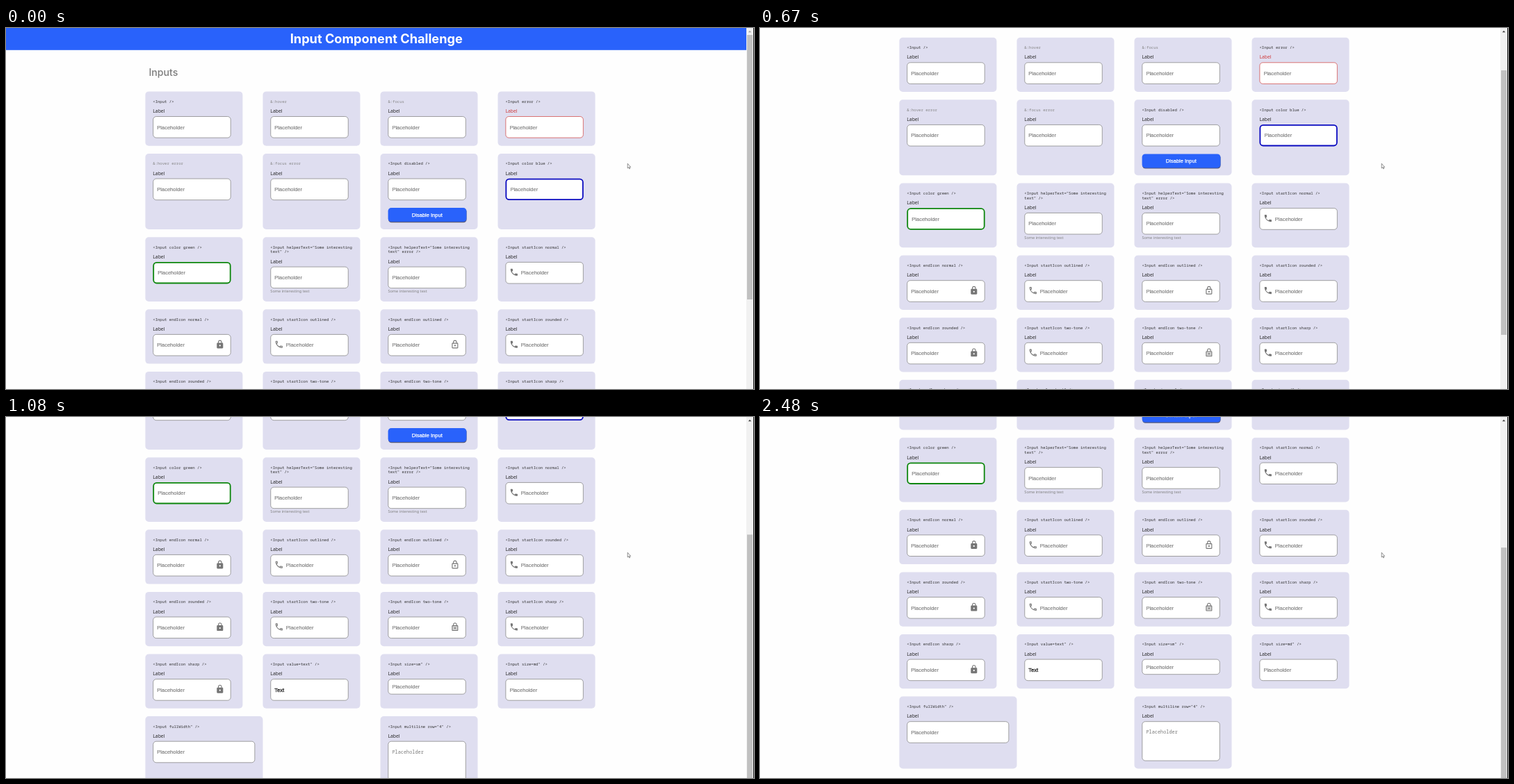
Write an HTML page that moves like this. It is 1076 px wide and 520 px high and loops after 3.29 s.

```html
<!DOCTYPE html>
<html lang="en">
<head>
<meta charset="utf-8">
<title>Input Component Challenge</title>
<style>
  html, body { margin: 0; width: 100%; height: 100%; overflow: hidden; background: #fefefe; }
  svg { display: block; width: 100%; height: 100%; }
  text { white-space: pre; }
  .title { font: 700 18.2px Inter, sans-serif; fill: #fff; text-anchor: middle; }
  .head { font: 500 14.2px Inter, sans-serif; fill: #7d7d7d; }
  .code { font: 5.6px "Noto Sans Mono", monospace; fill: #333; }
  .label { font: 6.8px "Noto Sans", sans-serif; fill: #2a2a2a; }
  .help { font: 5.6px "Noto Sans", sans-serif; fill: #828282; }
  .hint { font: 7.53px "Liberation Sans", Arial, sans-serif; fill: #7c7c7c; stroke: #7c7c7c; stroke-width: .15; }
  .value { fill: #333; stroke: #333; stroke-width: .35; }
  .area { font: 6.88px "Noto Sans Mono", monospace; stroke: none; }
  .btn { font: 7.53px "Liberation Sans", Arial, sans-serif; fill: #fff; stroke: #fff; stroke-width: .25; text-anchor: middle; }
  .dim { fill: #858585; }
  .err { fill: #d03c3c; }
</style>
</head>
<body>
<svg viewBox="0 0 1076 520" preserveAspectRatio="none">
  <rect width="1076" height="520" fill="#fefefe"/>
  <g id="page"></g>
  <rect x="1065" width="10" height="520" fill="#f1f1f1"/>
  <rect id="thumb" x="1066" y="10" width="8" height="381" fill="#c1c1c1"/>
  <path id="arrow" d="M1067.8 6.3L1070 3.8L1072.2 6.3Z"/>
  <rect x="1075" width="1" height="520" fill="#1a1a1a"/>
  <path d="M894.2 195.3V202L895.7 200.7L896.7 202.9L897.7 202.4L896.7 200.3H898.6Z"
        fill="#fff" stroke="#444" stroke-width=".6"/>
</svg>
<script>
const LOOP = 3290;
const PITCH = 169.05;
const LEFT = 200.4;
const ICON_SCALE = 0.565;

const lockBody = 'M18 8h-1V6c0-2.76-2.24-5-5-5S7 3.24 7 6v2H6c-1.1 0-2 .9-2 2v10c0 1.1.9 2 2 2h12c1.1 0 2-.9 2-2V10c0-1.1-.9-2-2-2z';
const lockArch = 'M15.1 8H8.9V6c0-1.71 1.39-3.1 3.1-3.1 1.71 0 3.1 1.39 3.1 3.1z';
const keyhole = 'M12 13a2 2 0 1 0 0 4a2 2 0 1 0 0-4z';
const icons = {
  phone: 'M6.62 10.79c1.44 2.83 3.76 5.14 6.59 6.59l2.2-2.2c.27-.27.67-.36 1.02-.24 1.12.37 2.33.57 3.57.57.55 0 1 .45 1 1V20c0 .55-.45 1-1 1-9.39 0-17-7.61-17-17 0-.55.45-1 1-1h3.5c.55 0 1 .45 1 1 0 1.25.2 2.45.57 3.57.11.35.03.74-.25 1.02z',
  phoneLine: 'M6.54 5c.06.89.21 1.76.45 2.59l-1.2 1.2c-.41-1.2-.67-2.47-.76-3.79zM16.4 17.02c.85.24 1.72.39 2.6.45v1.49c-1.32-.09-2.59-.35-3.8-.75zM7.5 3H4c-.55 0-1 .45-1 1 0 9.39 7.61 17 17 17 .55 0 1-.45 1-1v-3.49c0-.55-.45-1-1-1-1.24 0-2.45-.2-3.57-.57-.36-.12-.75-.03-1.02.24l-2.2 2.2c-2.83-1.45-5.15-3.76-6.59-6.59l2.2-2.2c.28-.28.36-.67.25-1.02C8.7 6.45 8.5 5.25 8.5 4c0-.55-.45-1-1-1z',
  lock: lockBody + lockArch + keyhole,
  lockLine: lockBody + lockArch + 'M6 10H18V20H6z' + keyhole
};

const el = (tag, attrs, body = '') =>
  `<${tag} ${Object.entries(attrs).map(([k, v]) => `${k}="${v}"`).join(' ')}>${body}</${tag}>`;
const esc = s => s.replace(/&/g, '&amp;').replace(/</g, '&lt;');
const text = (cls, x, y, s) => el('text', { class: cls, x, y }, esc(s));
const box = (x, y, width, height, rx, rest) => el('rect', { x, y, width, height, rx, ...rest });

function icon(name, x, y, twoTone) {
  const tint = twoTone && name === 'lockLine'
    ? el('path', { d: 'M6 10H18V20H6z', opacity: 0.35 }) : '';
  return el('g', { transform: `translate(${x} ${y}) scale(${ICON_SCALE})`, fill: '#757575' },
    tint + el('path', { d: icons[name], 'fill-rule': 'evenodd' }));
}

function button(x, y) {
  return box(x + .4, y + 1, 112.6, 20.2, 4.5, { fill: '#55597a' }) +
    box(x, y, 112.8, 20, 4.5, { fill: '#2962fb' }) +
    text('btn', x + 56.2, y + 12.5, 'Disable Input');
}

function card(col, top, height, code, o = {}) {
  const x = LEFT + col * PITCH, ix = x + 10.9;
  const width = o.full ? PITCH : 140;
  const lines = code.split('\n');
  const iy = top + 35.7 + (lines.length - 1) * 6.7;
  const h = o.h || 31.4, w = width - 27.7 + (o.full ? 5.6 : 0);
  const line = o.color ? 1.8 : .8;
  const mid = iy + h / 2;
  const inset = o.start ? 22.4 : o.color ? 7 : 6;
  let out = box(x, top, width, height, 5, { fill: '#dfdef0' });
  lines.forEach((s, i) => out += text('code' + (code[0] === '&' ? ' dim' : ''), ix, top + 16.4 + i * 6.6, s));
  out += text('label' + (o.error ? ' err' : ''), ix, iy - 5, 'Label');
  out += box(ix + line / 2, iy + line / 2, w - line, h - line, 4.5, {
    fill: '#fff', stroke: o.color || (o.error ? '#d25252' : '#8a8a8a'), 'stroke-width': line
  });
  out += text('hint' + (o.value ? ' value' : o.area ? ' area' : ''), ix + inset,
    o.area ? iy + 18.1 : mid + 2.7, o.value || 'Placeholder');
  if (o.start) out += icon(o.start, ix + 5.6, mid - 7.7);
  if (o.end) out += icon(o.end, ix + 89.7, mid - 7.7, o.twoTone);
  if (o.help) out += text('help', ix, iy + h + 6.2, 'Some interesting text');
  if (o.button) out += button(ix + .2, iy + 42.4);
  return out;
}

const helper = '<Input helperText="Some interesting\ntext"';
const rows = [
  [78.3, ['<Input />'], ['&:hover'], ['&:focus'], ['<Input error />', { error: true }]],
  [109, ['&:hover error'], ['&:focus error'], ['<Input disabled />', { button: true }],
    ['<Input color blue />', { color: '#0a0ac0' }]],
  [92.7, ['<Input color green />', { color: '#0c860c' }], [helper + ' />', { help: true }],
    [helper + ' error />', { help: true }], ['<Input startIcon normal />', { start: 'phone' }]],
  [78.3, ['<Input endIcon normal />', { end: 'lock' }], ['<Input startIcon outlined />', { start: 'phoneLine' }],
    ['<Input endIcon outlined />', { end: 'lockLine' }], ['<Input startIcon rounded />', { start: 'phone' }]],
  [78.3, ['<Input endIcon rounded />', { end: 'lock' }], ['<Input startIcon two-tone />', { start: 'phoneLine' }],
    ['<Input endIcon two-tone />', { end: 'lockLine', twoTone: true }], ['<Input startIcon sharp />', { start: 'phone' }]],
  [78.3, ['<Input endIcon sharp />', { end: 'lock' }], ['<Input value=text" />', { value: 'Text' }],
    ['<Input size=sm" />', { h: 22.4 }], ['<Input size=md" />']],
  [103.8, ['<Input fullWidth" />', { full: true }], null, ['<Input multiline row="4" />', { h: 57.2, area: true }]]
];

function buildPage() {
  let out = el('rect', { width: 1065, height: 31.8, fill: '#2962fb' }) +
    text('title', 532.8, 22, 'Input Component Challenge') +
    text('head', 205.4, 69, 'Inputs');
  let top = 91.4;
  for (const [height, ...cards] of rows) {
    cards.forEach((c, col) => { if (c) out += card(col, top, height, ...c); });
    top += height + 11.3;
  }
  return out;
}

// Scroll keys: time, offset, velocity. The view refreshes only at the ticks.
const keys = [[500, .6, .1], [670, 77.7, .55], [910, 190.3, .36], [1080, 243, .25], [1240, 271.5, .1]];
const ticks = [500, 580, 670, 750, 830, 910, 990, 1080, 1150, 1240];

function scrollAt(time) {
  const t = ticks.filter(k => k <= time).pop();
  if (t === undefined) return 0;
  const i = Math.min(keys.filter(k => k[0] <= t).length - 1, keys.length - 2);
  const [t0, y0, v0] = keys[i], [t1, y1, v1] = keys[i + 1];
  const d = t1 - t0, s = (t - t0) / d, r = 1 - s;
  return y0 + (y1 - y0) * s * s * (3 - 2 * s) + d * s * r * (v0 * r - v1 * s);
}

const page = document.getElementById('page');
const thumb = document.getElementById('thumb');
const arrow = document.getElementById('arrow');
page.innerHTML = buildPage();

function render(time) {
  const y = scrollAt(time);
  page.setAttribute('transform', `translate(0 ${-y})`);
  thumb.setAttribute('y', 10 + y * .656);
  arrow.setAttribute('fill', y > 0 ? '#404040' : '#a3a3a3');
}

const start = performance.now();
function tick() {
  render((performance.now() - start) % LOOP);
  requestAnimationFrame(tick);
}
tick();
</script>
</body>
</html>
```
